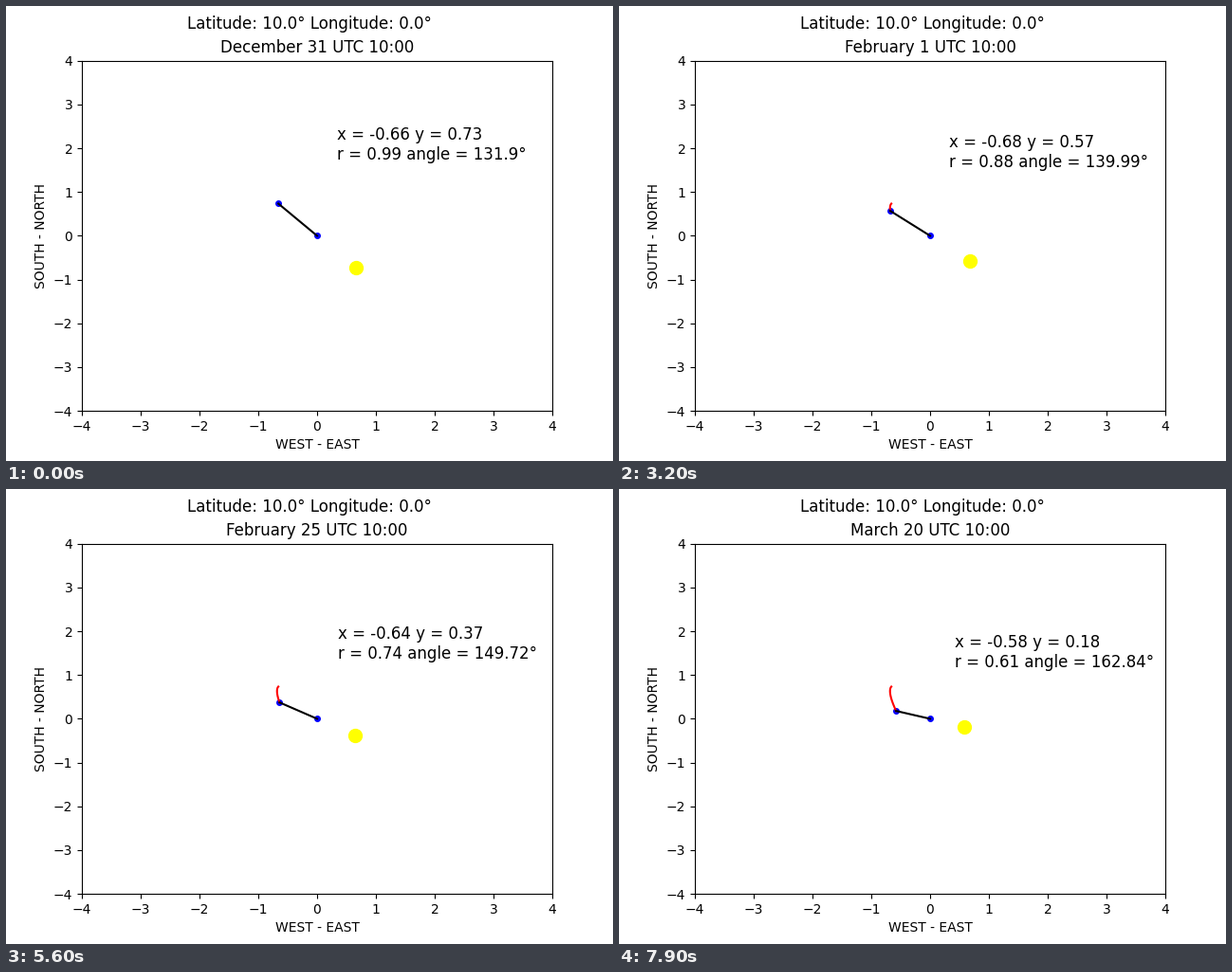
Write a matplotlib script that moves like this. It is 640 px wide and 480 px high and loops after 8 s.

```python
import numpy as np
import matplotlib.pyplot as plt
from matplotlib.animation import FuncAnimation

DAYS = 80
LAT = np.radians(10.0)
MONTHS = [("December", 1), ("January", 31), ("February", 28), ("March", 31)]

# Direction of the shadow (degrees) as a smooth curve through a few days
KEY_DAYS = np.array([0, 9, 22, 41, 56, 67, 79])
KEY_ANGLES = [131.9, 133.64, 136.89, 143.24, 149.72, 155.47, 162.84]

day = np.arange(DAYS)
angle = np.polyval(np.polyfit(KEY_DAYS / 79, KEY_ANGLES, 6), day / 79)

# Hour angle of the sun at 10:00, with the equation of time due to axial tilt
lon = np.radians(281.9 + 0.98563 * day)
k = np.tan(np.radians(23.0) / 2) ** 2
eot = np.arctan2(-k * np.sin(2 * lon), 1 + k * np.cos(2 * lon))
tan_h = np.tan(np.radians(29.65) + eot)

# Tip of the shadow of a stick of unit height
slope = -np.tan(np.radians(angle))
xs = -np.cos(LAT) * tan_h / (1 - tan_h * slope * np.sin(LAT))
ys = -xs * slope
rs = np.hypot(xs, ys)


def date_label(i):
    start = 31
    for name, length in MONTHS:
        if i < length:
            return f"{name} {start + i} UTC 10:00"
        i -= length
        start = 1


def info(i):
    x, y, r, a = (round(float(v[i]), 2) for v in (xs, ys, rs, angle))
    return f"x = {x} y = {y}\nr = {r} angle = {a}°"


fig, ax = plt.subplots(figsize=(6.4, 4.8), dpi=100)
fig.suptitle("Latitude: 10.0° Longitude: 0.0°")
ax.set(xlim=(-4, 4), ylim=(-4, 4), xlabel="WEST - EAST", ylabel="SOUTH - NORTH")
title = ax.set_title("")
sun, = ax.plot([], [], "o", color="yellow", markersize=10)
ends, = ax.plot([], [], "o", color="blue", markersize=4)
trail, = ax.plot([], [], color="red")
shadow, = ax.plot([], [], color="black")
label = ax.text(0, 0, "", fontsize=12)


def update(i):
    x, y = xs[i], ys[i]
    title.set_text(date_label(i))
    sun.set_data([-x], [-y])
    ends.set_data([0, x], [0, y])
    shadow.set_data([0, x], [0, y])
    trail.set_data(xs[:i + 1], ys[:i + 1])
    label.set_position((x + 1, y + 1))
    label.set_text(info(i))
    return title, sun, ends, trail, shadow, label


anim = FuncAnimation(fig, update, frames=DAYS, interval=100, repeat=True,
                     repeat_delay=0, blit=False)
plt.show()
```
